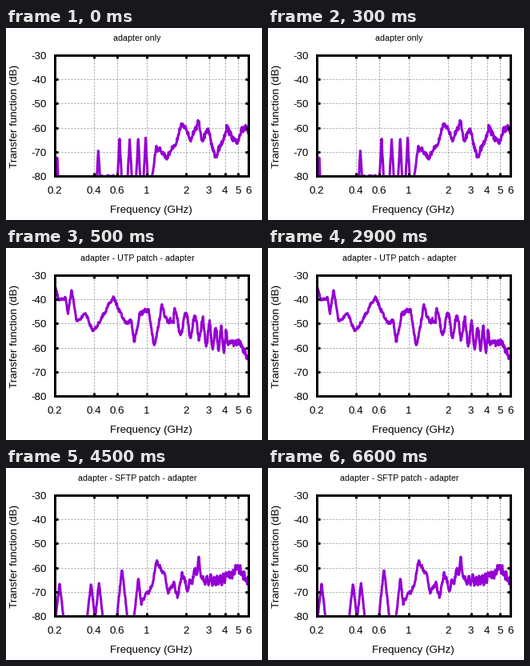
A matplotlib script for the animation above (8 s loop, 320 px wide and 240 px high).

```python
import numpy as np
import matplotlib.pyplot as plt
from matplotlib.animation import FuncAnimation
from matplotlib.patches import Rectangle

W, H, DPI = 320, 240, 100
LEFT, RIGHT, TOP, BOTTOM = 61.5, 303.5, 34.5, 185.5
PT = 72 / DPI  # points per pixel

plt.rcParams["font.family"] = "Liberation Sans"
plt.rcParams["path.simplify"] = False


def freq_x(f):
    return LEFT + (RIGHT - LEFT) * np.log(f / 0.2) / np.log(30)


def level_y(db):
    return TOP + (BOTTOM - TOP) * (-30 - db) / 50


F = np.geomspace(0.2, 6, 500)  # GHz


def trend(*points):
    """Straight runs on the log axis between a few (GHz, dB) points."""
    f, db = zip(*points)
    return np.interp(np.log(F), np.log(f), db)


def spike(f, db, slope):
    """Resonance peak falling off by slope dB per decade."""
    return db - slope * np.abs(np.log10(F / f))


def noise(seed):
    """Coarse wobble plus fine jitter, both growing with frequency."""
    rng = np.random.default_rng(seed)
    t = np.linspace(0, 1, F.size)
    coarse = np.interp(t, np.linspace(0, 1, 90), rng.uniform(-1, 1, 90))
    fine = rng.uniform(-1, 1, F.size)
    return (0.3 + 1.1 * t) * coarse + (0.4 + 0.9 * t) * fine


def adapter_only():
    db = trend((0.2, -82), (0.45, -80.3), (0.58, -80.3), (0.65, -82),
               (1.09, -82), (1.18, -68), (1.43, -72), (1.68, -66),
               (1.83, -58.5), (1.96, -58.5), (2.15, -66), (2.48, -57),
               (2.66, -66), (2.9, -60.5), (3.3, -72), (4.15, -59.5),
               (4.9, -68), (5.3, -60), (6, -60.5))
    for f, top in [(0.207, -72), (0.427, -68)]:
        db = np.maximum(db, spike(f, top, 1050))
    for f in 0.62 + 0.12 * np.arange(4):
        db = np.maximum(db, spike(f, -64, 1050))
    return db + noise(3)


def utp_patch():
    db = trend((0.2, -35), (0.213, -40), (0.24, -39), (0.25, -46),
               (0.267, -35), (0.29, -49), (0.34, -46), (0.39, -53),
               (0.46, -47), (0.55, -39), (0.7, -50), (0.76, -48),
               (0.8, -58), (0.88, -46), (1.03, -44), (1.14, -60),
               (1.3, -42), (1.42, -49), (2.3, -50.5), (3.5, -57),
               (5, -58), (6, -63))
    ripple = np.cos(2 * np.pi * (F - 2.33) / 0.342)
    return db + 4.5 * ripple * ((F > 1.6) & (F < 4.15)) + noise(5)


def sftp_patch():
    db = trend((0.2, -83), (0.75, -83), (0.97, -72), (1.1, -67),
               (1.19, -57), (1.38, -63), (1.45, -71), (1.6, -66),
               (1.72, -72), (1.85, -62), (2.05, -68), (2.5, -58),
               (2.7, -66), (4, -63.5), (5, -60.5), (6, -65))
    db = np.maximum(db, spike(0.375, -66, 500))
    for k, top in enumerate([-66, -66, -60, -64], 1):
        db = np.maximum(db, spike(0.216 * k, top, 500))
    ripple = np.cos(2 * np.pi * (F - 2.5) / 0.19)
    return db + 1.5 * ripple * (F > 1.9) + noise(8)


SCENES = [
    ("adapter only", adapter_only()),
    ("adapter - UTP patch - adapter", utp_patch()),
    ("adapter - SFTP patch - adapter", sftp_patch()),
]

fig = plt.figure(figsize=(W / DPI, H / DPI), dpi=DPI, facecolor="white")
ax = fig.add_axes([0, 0, 1, 1])
ax.set_xlim(0, W)
ax.set_ylim(H, 0)
ax.axis("off")


def line(xs, ys, color, width, **kw):
    return ax.plot(xs, ys, color=color, lw=width * PT, snap=False, **kw)[0]


def label(x, y, s, size=13.33, **kw):
    kw = {"ha": "center", "va": "baseline", **kw}
    return ax.text(x, y, s, fontsize=size * PT, color="black", **kw)


def grid(xs, ys):
    line(xs, ys, "#a0a0a0", 1, ls=(0, (2, 2)), dash_capstyle="butt", zorder=1)


def tick(xs, ys):
    line(xs, ys, "black", 3, solid_capstyle="butt", zorder=4)


for f in (0.2, 0.4, 0.6, 1, 2, 3, 4, 5, 6):
    x = np.floor(freq_x(f)) + 0.5
    label(x - 0.8, 207, f"{f:g}")
    if 0.2 < f < 6:
        grid([x, x], [BOTTOM, TOP])
        tick([x, x], [BOTTOM, BOTTOM - 4])
        tick([x, x], [TOP, TOP + 4])

for db in range(-80, -29, 10):
    y = np.floor(level_y(db)) + 0.5
    label(51, y + 4.5, str(db), ha="right")
    if -80 < db < -30:
        grid([LEFT, RIGHT], [y, y])
        tick([LEFT, LEFT + 4], [y, y])
        tick([RIGHT, RIGHT - 4], [y, y])


def box(**kw):
    return Rectangle((LEFT, TOP), RIGHT - LEFT, BOTTOM - TOP, **kw)


ax.add_patch(box(fill=False, ec="black", lw=3 * PT, joinstyle="miter",
                 snap=False, zorder=5))

label(181, 231, "Frequency (GHz)")
label(17, 110, "Transfer function (dB)", rotation=90, ha="right", va="center")
title = label(164, 16, "", 10.67)
curve = line([], [], "#9400d3", 3, solid_joinstyle="round", zorder=3)
curve.set_clip_path(box(transform=ax.transData))


def update(i):
    scene = 0 if i < 1 else 1 if i < 9 else 2
    text, levels = SCENES[scene]
    title.set_text(text)
    curve.set_data(freq_x(F), level_y(levels))
    return title, curve


anim = FuncAnimation(fig, update, frames=16, interval=500, repeat=True,
                     repeat_delay=0)
plt.show()
```
